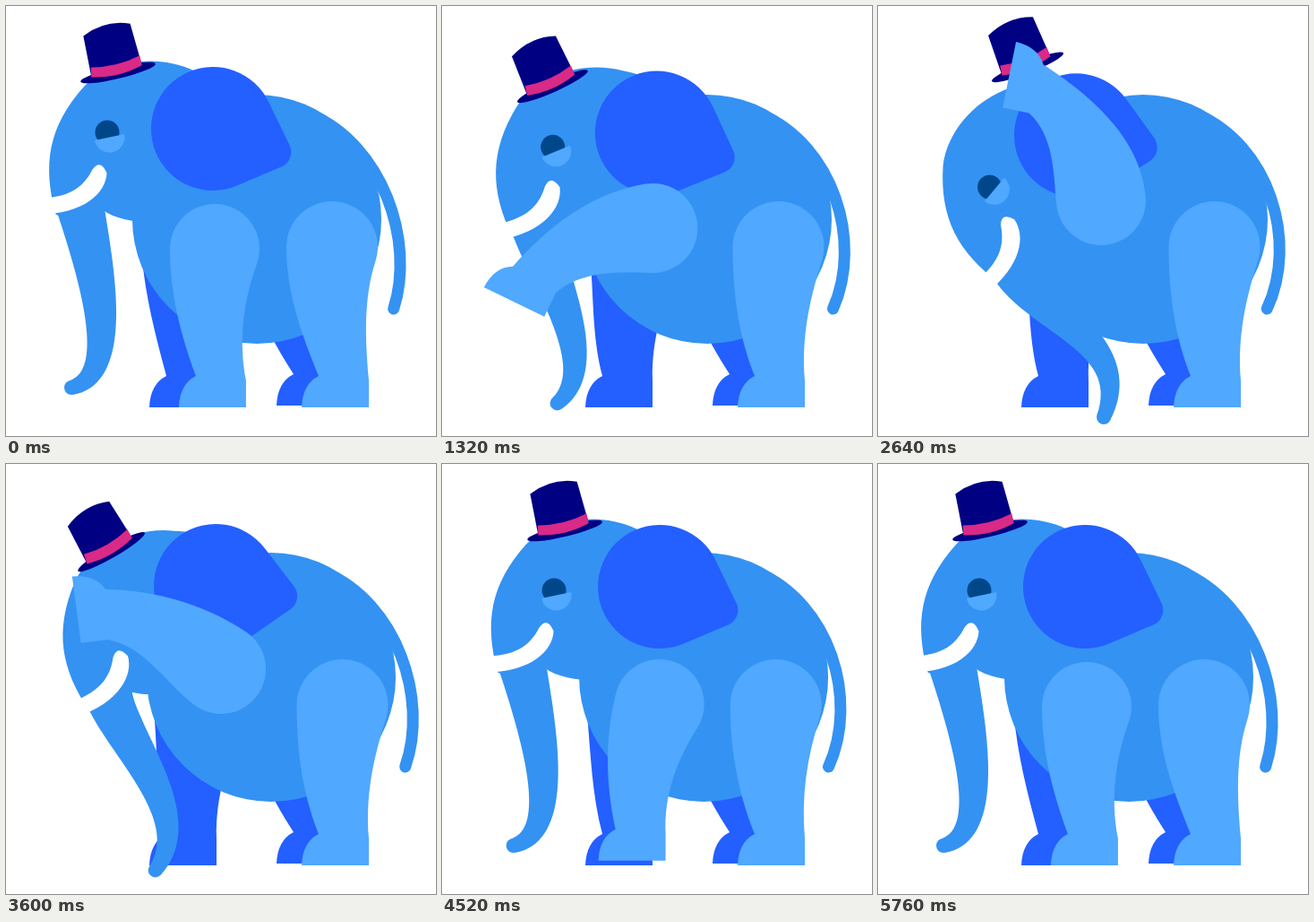
An HTML page with a canvas for the animation above (5800 ms loop, 480 by 480 pixels).

```html
<!DOCTYPE html>
<html lang="en">
<head>
<meta charset="utf-8">
<title>Elephant tipping its hat</title>
<style>
html, body { margin: 0; width: 100%; height: 100%; overflow: hidden; background: #fff; }
canvas { display: block; }
</style>
</head>
<body>
<canvas id="stage" width="480" height="480"></canvas>
<script>
const c = document.getElementById('stage').getContext('2d');
const LOOP = 5800, RAD = Math.PI / 180;
const SKIN = '#3492f2', LIGHT = '#50a8ff', DARK = '#245fff';
const NAVY = '#000082', PINK = '#d82a86', PUPIL = '#00478a';

const ease = u => u * u * (3 - 2 * u);
const ramp = (t, from, to) => ease(Math.min(1, Math.max(0, (t - from) / (to - from))));
const mix = (a, b, u) => a + (b - a) * u;
const polar = ([x, y], r, deg) => [x + r * Math.cos(deg * RAD), y + r * Math.sin(deg * RAD)];
const distance = (a, b) => Math.hypot(a[0] - b[0], a[1] - b[1]);

// Progress of each gesture, 0 at rest and 1 at its peak
const lean = t => ramp(t, 0, 960) - ramp(t, 4150, 5300);
const bow = t => ramp(t, 700, 2500) - ramp(t, 2950, 4250);
const raise = t => ramp(t, 680, 2100) - ramp(t, 3097, 4757);
const doff = t => ramp(t, 1560, 2270) - ramp(t, 3050, 3720);

function turn([x, y], deg, [ox, oy]) {
  const cos = Math.cos(deg * RAD), sin = Math.sin(deg * RAD);
  return [ox + x * cos - y * sin, oy + x * sin + y * cos];
}

function fill(color, path) {
  c.fillStyle = color;
  if (path instanceof Path2D) return c.fill(path);
  c.beginPath();
  path();
  c.fill();
}

const disc = (color, x, y, r) => fill(color, () => c.arc(x, y, r, 0, 7));

function at([x, y], deg, draw) {
  c.save();
  c.translate(x, y);
  c.rotate(deg * RAD);
  draw();
  c.restore();
}

// Angles come in pairs: front edge, back edge
function leg(color, { hip, toe, sole = 0, thigh, shin, r = 50 }) {
  const foot = (x, y) => turn([x, y], sole, toe);
  const front = polar(hip, r, thigh[0] + 90), back = polar(hip, r, thigh[1] - 90);
  const ankle = foot(19, -35), heel = foot(75, -30);
  const df = distance(front, ankle), db = distance(back, heel);
  fill(color, () => {
    c.arc(...hip, r, (thigh[0] + 90) * RAD, (thigh[1] + 270) * RAD);
    c.bezierCurveTo(...polar(back, db * .33, thigh[1]), ...polar(heel, db * .35, shin[1]), ...heel);
    c.lineTo(...foot(75, 0));
    c.lineTo(...toe);
    c.quadraticCurveTo(...foot(1, -26), ...ankle);
    c.bezierCurveTo(...polar(ankle, df * .32, shin[0]), ...polar(front, df * .36, thigh[0]), ...front);
  });
}

// The foot swings round the hip; the thigh and the sole follow it
function wavingLeg(g, shift) {
  const hip = [233 + shift - 14 * Math.sin(Math.PI * g), 271 - 54 * g];
  const swing = 91 + 143 * g, sole = 101.5 * ease(g ** 1.3);
  const thigh = 90 + 175 * g + 13 * Math.sin(2 * Math.PI * g);
  const [x, y] = polar(hip, 177 - 3 * g, swing);
  const middle = [x - shift * (1 - g) ** 20, y];
  return {
    hip, sole, toe: turn([-37, 0], sole, middle),
    thigh: [thigh, thigh + 20 * (1 - g)],
    shin: [swing - 201, swing - 192]
  };
}

// Tapering tube along a cubic curve
function trunk(curve) {
  const left = [], right = [];
  for (let i = 0; i <= 40; i++) {
    const u = i / 40, v = 1 - u, half = 27 - 19 * u;
    const [x, y] = [0, 1].map(k => {
      const [p, q, r, s] = curve.map(point => point[k]);
      return v * v * v * p + 3 * v * v * u * q + 3 * v * u * u * r + u * u * u * s;
    });
    const [dx, dy] = [0, 1].map(k => {
      const [p, q, r, s] = curve.map(point => point[k]);
      return v * v * (q - p) + 2 * v * u * (r - q) + u * u * (s - r);
    });
    const scale = half / Math.hypot(dx, dy);
    left.push([x - dy * scale, y + dx * scale]);
    right.unshift([x + dy * scale, y - dx * scale]);
  }
  fill(SKIN, () => left.concat(right).forEach(p => c.lineTo(...p)));
  disc(SKIN, ...curve[3], 8);
}

function tail(x, swing) {
  c.strokeStyle = SKIN;
  c.lineWidth = 13;
  c.lineCap = 'round';
  c.beginPath();
  c.moveTo(x + 60, 121);
  c.bezierCurveTo(x + 140, 155, x + 175 + 2 * swing, 262, x + 144 + 8.7 * swing, 338);
  c.stroke();
}

// Head parts are drawn around the eye
const skull = new Path2D('M-60 86C-75 30-68-12-29-56C-2-84 50-95 95-74C125-62 140-50 140-20' +
  'C140 50 110 95 60 95C30 96 8 92-8 81L-30 100Z');
const tusk = new Path2D('M-80 68C-48 68-30 58-19 36Q-10 24-3 40C-4 62-28 86-80 86Z');
const crown = new Path2D('M-30-2L-28-49Q0-61 26-50L28-2Q0 7-30-2Z');
const band = new Path2D('M-28-13Q0-6 28-13L28-2Q0 6-30-2Z');

function face() {
  disc(PUPIL, -2.5, -5.5, 13.5);
  fill(LIGHT, () => c.arc(0, 0, 17, -12 * RAD, 168 * RAD));
  fill('#fff', tusk);
}

function hat() {
  fill(NAVY, () => c.ellipse(0, 0, 43, 6.5, 0, 0, 7));
  fill(NAVY, crown);
  fill(PINK, band);
}

// Hull of a large circle and a small corner circle
function ear(centre, dir) {
  const spread = Math.acos((69 - 18) / 74), d = dir * RAD;
  fill(DARK, () => {
    c.arc(...centre, 69, d + spread, d - spread + 2 * Math.PI);
    c.arc(...polar(centre, 74, dir), 18, d - spread, d + spread);
  });
}

function draw(t) {
  const shift = 16 * lean(t), body = 280 + shift;
  const p = bow(t), lag = p - bow(t - 300), lift = doff(t);
  const tilt = -38 * p;
  const eye = turn([-84, -31.5], tilt, [199.5 + shift, 178]);
  const skew = -.45 * shift * (1 - p);
  const head = [eye[0] + skew, eye[1]], nose = shift + skew;

  c.fillStyle = '#fff';
  c.fillRect(0, 0, 480, 480);

  tail(body, Math.cos(t / LOOP * 6 * Math.PI));
  leg(DARK, { hip: [318, 270], toe: [302, 446], thigh: [90, 105], shin: [-122, -95] });
  leg(DARK, { hip: [201 + shift * .87, 271], toe: [160, 448], thigh: [85, 108], shin: [-105, -92] });
  disc(SKIN, body, 238, 139);

  trunk([
    turn([-34, 72], tilt, head),
    [100 + nose + 56 * p * p, 295 + 50 * p * p],
    [mix(130, 272, p) + nose, mix(412, 374, p)],
    [mix(73, 236, p) + nose, mix(426, 459, p) + 11 * Math.sin(Math.PI * p)]
  ]);
  at(head, tilt, () => fill(SKIN, skull));
  at(eye, tilt, face);
  const [hx, hy] = turn([9.5, -72], tilt, eye);
  at([hx + 74 * lift, hy - 74 * lift], tilt - 13.5 + 30 * lift, hat);
  ear([231 + shift - 26 * p, 137 + 7 * p + 14 * lag], 20.6 - 10.5 * p + 20 * lag);

  leg(LIGHT, { hip: [364 + shift * .72, 269], toe: [330, 448], thigh: [90, 108], shin: [-112, -95], r: 51 });
  leg(LIGHT, wavingLeg(raise(t), shift));
}

const begin = performance.now();
function tick() {
  draw((performance.now() - begin) % LOOP);
  requestAnimationFrame(tick);
}
tick();
</script>
</body>
</html>
```
